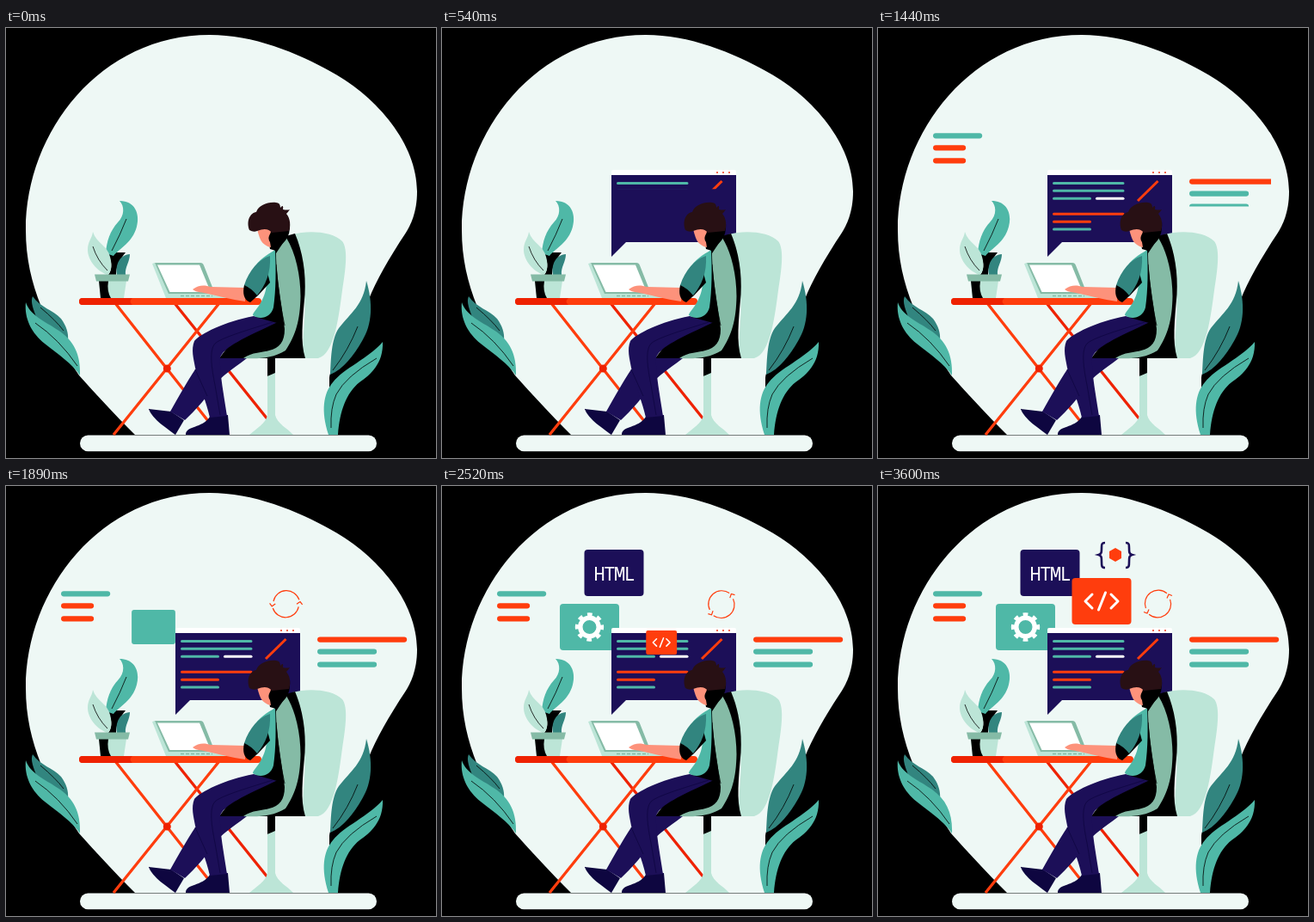
An HTML page for the animation above (4110 ms loop, 500 by 500 pixels).

```html
<!DOCTYPE html>
<html lang="en">
<head>
<meta charset="utf-8">
<title>Developer at a desk</title>
<style>
  html, body { margin: 0; height: 100%; overflow: hidden; background: #000; }
  svg { display: block; width: 100%; height: 100%; }
  .pale { fill: #eef8f5 } .mint { fill: #bce5d7 } .sage { fill: #85bba6 }
  .teal { fill: #4fb8a7 } .deep { fill: #32857f } .navy { fill: #1c0f58 }
  .ink { fill: #0e0640 } .skin { fill: #fd927b } .hair { fill: #281014 }
  .orange { fill: #ff3d0d } .red { fill: #ee2200 } .white { fill: #fff }
  .line { fill: none; stroke-width: 3 }
  .round { stroke-linecap: round; stroke-linejoin: round }
  .s-teal { stroke: #4fb8a7 } .s-orange { stroke: #ff3d0d } .s-red { stroke: #ee2200 }
  .s-white { stroke: #fff } .s-navy { stroke: #1c0f58 }
  .vein { fill: none; stroke: #000; stroke-width: .8 }
  .wide { stroke-width: 6.3 }
  text { font: 22px "Noto Sans Mono", monospace; letter-spacing: -1.5px; text-anchor: middle }
</style>
</head>
<body>
<svg viewBox="0 0 500 500">
  <defs>
    <clipPath id="codeClip"><rect x="198" y="176" width="144"/></clipPath>
    <clipPath id="leftClip"><rect x="60" y="121"/></clipPath>
    <clipPath id="rightClip"><rect x="358" y="175"/></clipPath>
  </defs>

  <path class="pale" d="M237 8C287 8 338 28 380 52C432 81 478 135 478 190C478 215 470 230 465 238C445 268 430 295 422 315C405 352 376 395 376 407V473H150C125 448 104 425 85 404C50 350 23 300 23 235C23 120 110 8 237 8Z"/>
  <rect class="pale" x="86" y="473.500" width="345" height="18.800" rx="9.400"/>

  <!-- floor leaves -->
  <path class="deep" d="M31 312C40 325 55 328 64 338C70 346 73 355 72 363C60 358 45 350 36 338C32 328 28 318 31 312Z"/>
  <path class="teal" d="M23 319C28 334 45 341 60 351C79 363 87 380 86 404C78 391 60 379 45 367C30 355 21 338 23 319Z"/>
  <path class="deep" d="M419 294C427 320 426 345 414 364C405 380 392 397 377 403C378 385 378 362 387 349C400 332 416 322 419 294Z"/>
  <path class="teal" d="M438 365C439 390 424 403 411 412C396 424 388 445 386 473H375C366 445 369 425 380 412C392 396 422 384 438 365Z"/>
  <path class="vein" d="M34 343Q62 362 83 393M40 325Q58 340 67 352M409 347Q398 375 380 398M431 384Q395 405 384 426Q377 442 378 465"/>

  <!-- floating interface -->
  <g id="gearCard">
    <rect class="teal" x="137" y="137" width="69" height="54" rx="4"/>
  </g>
  <g id="gear" class="line s-white">
    <circle cx="171.5" cy="164" r="10.7" stroke-width="5.4"/>
    <circle cx="171.5" cy="164" r="14.5" stroke-width="4.4" pathLength="8" stroke-dasharray=".48 .52" stroke-dashoffset=".24"/>
  </g>
  <g id="window">
    <path class="white" d="M199 165H340Q342 165 342 167V171H197V167Q197 165 199 165Z"/>
    <path class="navy" d="M197 171H342V249H214L197 266Z"/>
    <path class="line round s-red" style="stroke-width:1.800" d="M320 168h0M327 168h0M334 168h0"/>
  </g>
  <g clip-path="url(#codeClip)" class="line round">
    <path class="s-teal" d="M204.500 180.500H285M204.500 189.300H285M204.500 198.300H246.500M204.500 234H246.500"/>
    <path class="s-white" d="M254.500 198.300H285"/>
    <path class="s-orange" d="M204.500 216.300H285M204.500 225.300H246.500"/>
    <path class="s-orange" stroke-linecap="butt" d="M302 201L325.500 178"/>
  </g>
  <g clip-path="url(#leftClip)" class="line round wide">
    <path class="s-teal" d="M67.200 125.300H118"/>
    <path class="s-orange" d="M67.200 139.300H99M67.200 154.300H99"/>
  </g>
  <g clip-path="url(#rightClip)" class="line round wide">
    <path class="s-orange" d="M365.200 178.600H463"/>
    <path class="s-teal" d="M365.200 192.600H428M365.200 207.600H428"/>
  </g>
  <g id="cycle" class="line s-orange" style="stroke-width:1.2">
    <path id="half" d="M311.400 142.100A15.500 15.500 0 0 1 335.900 124.800M336 130.500L338 126L342 127.500"/>
    <use href="#half" transform="rotate(180 325.500 137)"/>
  </g>
  <g id="htmlCard">
    <rect class="navy" x="165.500" y="74" width="69" height="54" rx="4"/>
    <text class="white" x="200" y="110">HTML</text>
  </g>
  <g id="codeCard">
    <rect class="orange" x="225.500" y="107" width="69" height="54" rx="4"/>
    <path class="line round s-white" d="M249 126L241 134L249 142M264.500 124L256.500 144M271 126L279 134L271 142"/>
  </g>
  <g id="braces">
    <path id="brace" class="line s-navy" style="stroke-width:2.600" d="M264 66C260 66 260 68 260 72C260 77 260 79 256.500 80C260 81 260 83 260 88C260 93 260 95 264 95"/>
    <use href="#brace" transform="matrix(-1 0 0 1 552 0)"/>
    <path class="orange" d="M276 72L283 76V84L276 88L269 84V76Z"/>
  </g>

  <!-- potted plant -->
  <path d="M116 261H139C130 272 128 280 128 287H119C124 280 124 270 116 261Z"/>
  <path class="teal" d="M132 201C150 201 156 216 152 231C147 250 132 256 125 265L116 262C117 248 121 236 130 226C138 218 138 207 132 201Z"/>
  <path class="mint" d="M101 237C105 250 118 253 121 266C124 276 122 286 118 287C106 283 95 270 95 258C95 248 100 245 101 237Z"/>
  <path class="deep" d="M144 263C132 264 127 275 129 287H139C138 278 144 272 144 263Z"/>
  <path class="vein" d="M140 222Q133 240 123 259M101 254Q106 270 118 282"/>
  <path class="mint" d="M108 294H140L137 314H110Z"/>
  <path d="M108 294H119Q117 306 122 314H110Z"/>
  <path class="sage" d="M103 286.500H144L142 294.500H105Z"/>

  <!-- table -->
  <g class="line" style="stroke-width:3.300">
    <path class="s-red" d="M196 320L305 456"/>
    <path class="s-orange" d="M127 320L239 462M248 320L125 473"/>
  </g>
  <circle class="red" cx="187.300" cy="396" r="4.500"/>
  <rect class="orange" x="85" y="314" width="212" height="8" rx="4"/>
  <path class="red" d="M89 314H147Q142 318 147 322H89A4 4 0 0 1 89 314Z"/>

  <!-- laptop -->
  <path class="mint" d="M170 274L173 273L190 308H262L270 314H186Z"/>
  <path class="sage" d="M173 273H226Q229 273 230 276L243 309H189Z"/>
  <path class="white" d="M176 275.500H225L238 307H190.500Z"/>
  <path class="line" stroke="#85bba6" style="stroke-width:1.500" stroke-dasharray="4 2" d="M203 311.500H240"/>

  <!-- chair -->
  <path class="mint" d="M333 240C350 235 380 236 391 248C398 257 395 280 391 305C387 335 382 379 363 384H345C345 350 350 330 346 300C344 275 338 250 333 240Z"/>
  <path d="M322 243L336 239C345 260 349 285 347.500 310C345 340 342 365 348 384H248L262 365L320 330ZM304 384H313V402L304 405Z"/>
  <path class="mint" d="M304 405L313 401V450C315 460 328 466 334 473H283C292 465 302 460 304 450Z"/>

  <!-- legs -->
  <path class="ink" d="M166 443L192 446L207 456L197 473C188 466 170 455 166 443ZM237 452L258 450L260 473H209C209 462 228 466 237 452Z"/>
  <path class="navy" d="M248 384H280C262 398 250 405 243 415C235 428 220 445 208 456L191 446C200 430 210 412 220 397Z"/>
  <path class="navy" d="M288 335C255 341 225 356 219 364C215 374 218 384 220 395C226 420 233 435 237 453L257 451C254 430 248 400 249 384C252 371 278 360 316 342Z"/>
  <path class="vein" style="stroke:#0e0640" d="M310 342C285 350 250 360 243 367C236 375 239 395 243 415L249 450M166 443L196 469M220 397L234 428"/>

  <!-- body -->
  <path d="M312 258L322 243L326 346L290 336Q312 320 309 285Z"/>
  <path class="sage" d="M314 262L326 244C337 262 342.500 288 342.500 312C342 340 337 357 325 375C310 384 295 385 276 384C285 377 300 377 306 375C318 372 324 365 324 350C322 330 314 290 314 262Z"/>
  <path class="vein" d="M314 275Q317 315 324 346"/>
  <path class="teal" d="M313 258C303 264 293 270 288 280L303 295C303 305 300 312 297 318C292 327 287 331 287 334C295 340 308 337 311 325C314 305 314 280 313 258Z"/>
  <path class="skin" d="M217 304C224 298 232 299 238 301L279 302L278 318C262 316 245 311 235 309C228 307 222 308 217 304Z"/>
  <path d="M277 299C275 308 276 316 284 319L293 311L307 296L304 285Z"/>
  <path class="deep" d="M307 265C294 269 283 281 277 299Q286 303 292 311C302 299 308 285 307 265Z"/>

  <!-- head -->
  <path d="M303 233L330 225Q331 240 325 247L314 259L307 257Z"/>
  <path class="skin" d="M292 234C295 244 296 252 308 255L307 249C303 243 308 240 308 236L302 232Z"/>
  <path class="hair" d="M283 235C279 224 284 215 291 214C294 206 304 202 314 203Q319 203 319 209Q323 204 322 211Q327 212 330 211Q328 214 326 216C331 222 331 230 329 236L309 238Q304 231 292 236Q288 238 283 235Z"/>
</svg>
<script>
  const LOOP = 4110, END = 3600, STEP = 30;
  const el = id => document.getElementById(id);
  const progress = (t, from, to) => Math.min(1, Math.max(0, (t - from) / (to - from)));
  const smooth = p => (1 - Math.cos(Math.PI * p)) / 2;

  // Scale and turn around (x, y), optionally shifted by (dx, dy).
  function pose(id, x, y, scale, angle = 0, dx = 0, dy = 0) {
    el(id).setAttribute('transform',
      `translate(${x + dx} ${y + dy}) rotate(${angle}) scale(${scale}) translate(${-x} ${-y})`);
  }

  function reveal(id, height, width) {
    const rect = el(id).firstElementChild;
    rect.setAttribute('height', height);
    if (width !== undefined) rect.setAttribute('width', width);
  }

  function draw(t) {
    pose('window', 269.5, 215, smooth(progress(t, 0, 450)));
    reveal('codeClip', 62 * progress(t, 440, 990));

    const left = progress(t, 900, 1200), right = progress(t, 1170, 1470);
    reveal('leftClip', 38 * left, 64 * left);
    reveal('rightClip', 36 * right, 110 * right);

    pose('cycle', 325.2, 137.3, progress(t, 1480, 1750), 360 * smooth(progress(t, 1480, 3600)));
    pose('gearCard', 171.5, 164, progress(t, 1680, 1965));
    pose('gear', 171.5, 164, progress(t, 1950, 2200), 225 * progress(t, 2240, 3600));
    pose('htmlCard', 200, 101, progress(t, 2130, 2400));

    const code = progress(t, 2340, 2686), braces = progress(t, 2680, 2962);
    pose('codeCard', 260, 134, code, 0, -10 * (1 - code), 100 * (1 - code));
    pose('braces', 276, 80, braces, 0, 0, 137 * (1 - braces));
  }

  function frame(now) {
    const t = now % LOOP;
    draw(Math.min(END, Math.floor(t / STEP) * STEP));
    requestAnimationFrame(frame);
  }
  draw(0);
  requestAnimationFrame(frame);
</script>
</body>
</html>
```
